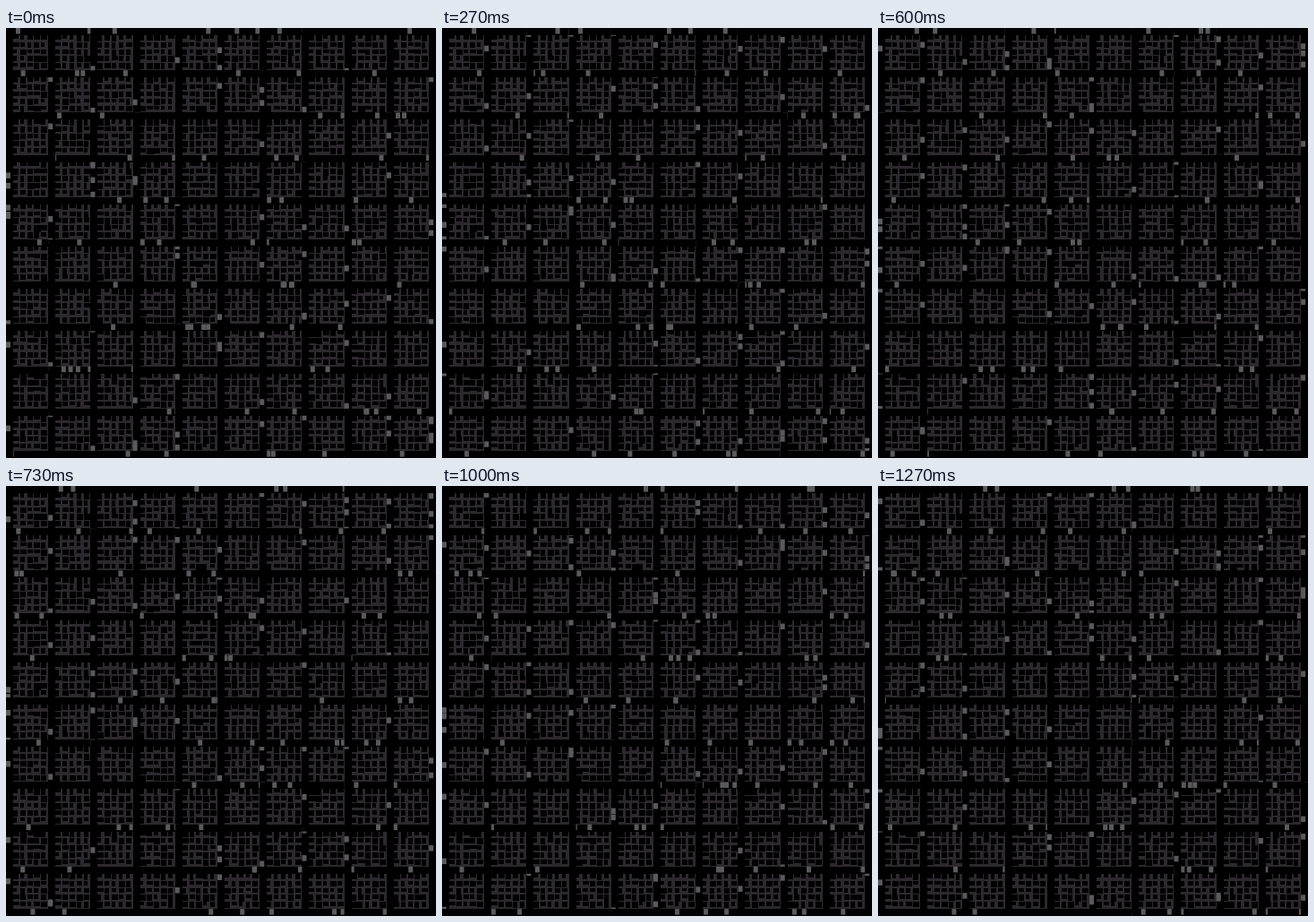
Write an HTML page with a canvas that moves like this. It is 480 px wide and 480 px high and loops after 1330 ms.

```html
<!DOCTYPE html>
<html lang="en">
<head>
<meta charset="utf-8">
<title>City grid</title>
<style>
  html, body { margin: 0; height: 100%; overflow: hidden; background: #000; }
  canvas { display: block; width: 480px; height: 480px; }
</style>
</head>
<body>
<canvas id="city" width="480" height="480"></canvas>
<script>
const SIZE = 480, BLOCKS = 10, LOTS = 5;
const CELL = SIZE / 61, PITCH = CELL * (LOTS + 1);
const LOOP = 1330, STEP = 200 / 3;
const CARS = 8, CAR_W = 5, CAR_H = 6.5, WRAP = SIZE + CELL;
const BLACK = '#000', GROUND = '#2c292d', CAR = '#5a595b';

function seeded(seed) {
  return () => {
    seed = (seed * 1664525 + 1013904223) >>> 0;
    return seed / 4294967296;
  };
}

const rand = seeded(61);
const between = (min, max) => min + rand() * (max - min);
const list = (n, make) => Array.from({ length: n }, (_, i) => make(i));

// Each street has its own set of cars, each with a steady speed in px per step.
const makeStreets = () => list(BLOCKS + 1, () => list(CARS, () => ({
  start: between(0, WRAP),
  speed: between(4.5, 9.2)
})));
const rows = makeStreets();
const cols = makeStreets();

function fillSnapped(g, x, y, w, h) {
  const left = Math.round(x), top = Math.round(y);
  g.fillRect(left, top, Math.round(x + w) - left, Math.round(y + h) - top);
}

function makeBlocks() {
  const layer = document.createElement('canvas');
  layer.width = layer.height = SIZE;
  const g = layer.getContext('2d');
  const side = () => CELL * between(0.5, 0.92);
  for (let by = 0; by < BLOCKS; by++) {
    for (let bx = 0; bx < BLOCKS; bx++) {
      const x0 = bx * PITCH + CELL, y0 = by * PITCH + CELL;
      g.fillStyle = GROUND;
      fillSnapped(g, x0, y0, CELL * LOTS, CELL * LOTS);
      g.fillStyle = BLACK;
      for (let i = 0; i < LOTS * LOTS; i++) {
        const x = x0 + (i % LOTS) * CELL;
        const y = y0 + Math.floor(i / LOTS) * CELL;
        fillSnapped(g, x, y, side(), side());
      }
    }
  }
  return layer;
}

const blocks = makeBlocks();
const ctx = document.getElementById('city').getContext('2d');

// Top or left edge of a car; it re-enters after leaving the stage.
const place = (car, step) => (car.start + car.speed * step) % WRAP - CELL;

function draw(step) {
  ctx.drawImage(blocks, 0, 0);
  ctx.fillStyle = CAR;
  rows.forEach((street, i) => street.forEach(car =>
    ctx.fillRect(place(car, step), i * PITCH, CAR_W, CAR_H)));
  cols.forEach((street, i) => street.forEach(car =>
    ctx.fillRect(i * PITCH, place(car, step), CAR_W, CAR_H)));

  // Cars pass unseen through the crossings.
  ctx.fillStyle = BLACK;
  for (let y = 0; y <= BLOCKS; y++) {
    for (let x = 0; x <= BLOCKS; x++) {
      ctx.fillRect(x * PITCH, y * PITCH, CELL, CELL);
    }
  }
}

let shown = -1;
function tick() {
  // The small offset matches step starts rounded to 10 ms.
  const step = Math.floor((performance.now() % LOOP + 3.4) / STEP);
  if (step !== shown) {
    shown = step;
    ctx.fillStyle = BLACK;
    ctx.fillRect(0, 0, SIZE, SIZE);
    draw(step);
  }
  requestAnimationFrame(tick);
}
tick();
</script>
</body>
</html>
```
